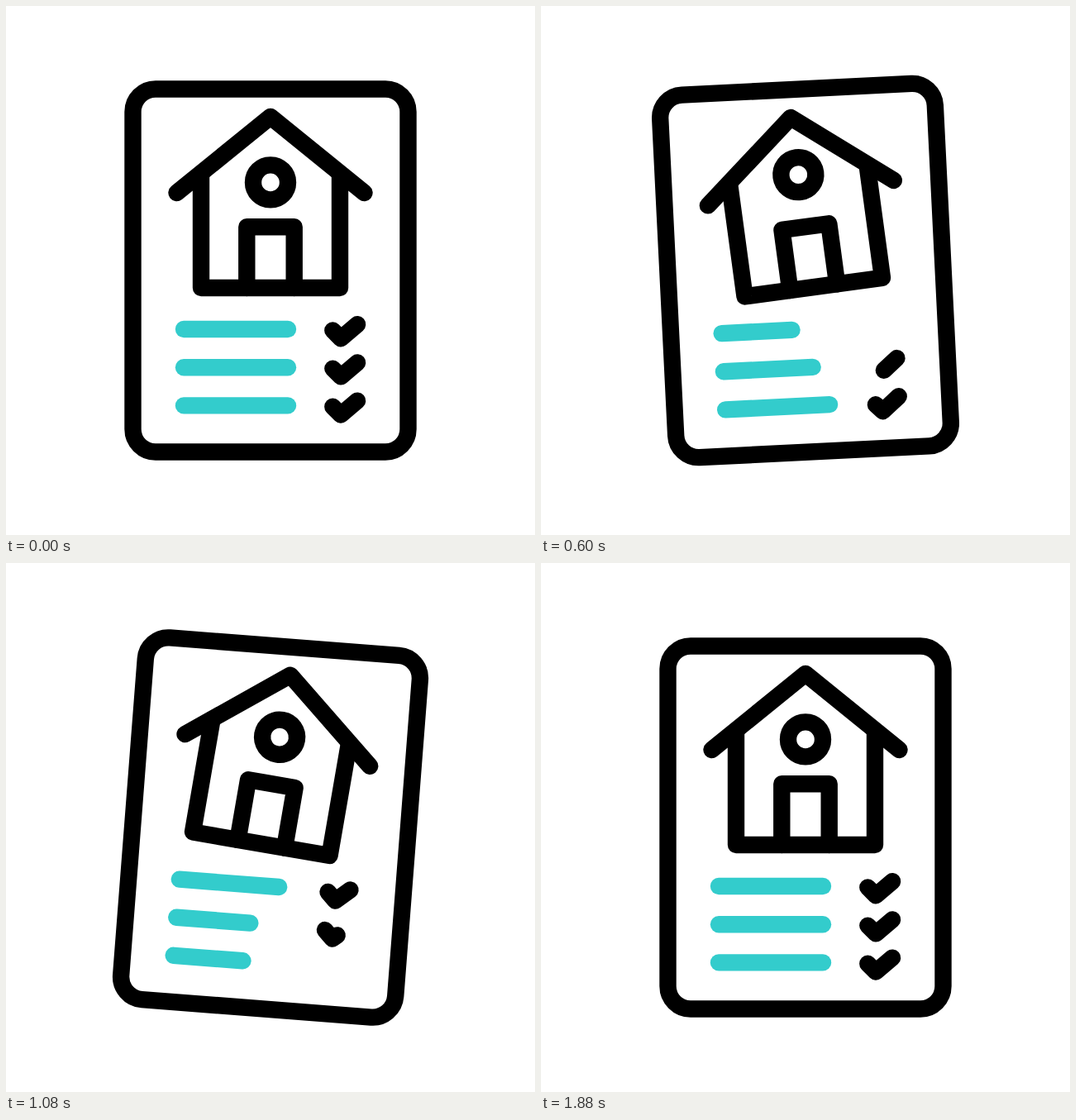
Recreate the animation shown at these times as an HTML page. Size 640 by 640 pixels, loop 1.96 s.

```html
<!DOCTYPE html>
<html lang="en">
<head>
<meta charset="utf-8">
<title>House checklist</title>
<style>
  html, body { margin: 0; width: 100%; height: 100%; overflow: hidden; background: #fff; }
  svg { display: block; width: 100%; height: 100%; }
  .ink { fill: none; stroke: #000; stroke-width: 20.4; stroke-linecap: round; stroke-linejoin: round; }
  .bar { stroke: #3cc; }
</style>
</head>
<body>
<svg viewBox="0 0 640 640">
  <g id="page" class="ink">
    <rect x="153.5" y="100.5" width="333" height="439" rx="27.5"/>
    <g id="house">
      <path d="M206.5 226 320 134 433.5 226"/>
      <path d="M236 206V341H404V206"/>
      <path d="M291.3 341V267.3H348.7V341"/>
      <circle id="window" cx="320" cy="213.4" r="21"/>
    </g>
    <g id="rows"></g>
  </g>
</svg>
<script>
const STEP = 40, LOOP = 1960, ROW_DELAY = 5;
const BAR = 126, BAR_CUT = 42;

// Keyframes: [step, value]
const pageTurn = [[1, 0], [10.7, -4], [13.3, -4], [22.5, 9], [23, 9], [33, -4], [44.8, 0]];
const houseTurn = [[1.5, 0], [14.2, -5.1], [24, 7.3], [36, -5], [45.5, 0]];
const windowLift = [[9, 0], [18.5, 14], [31, 0]];
const barCut = [[5, 0], [16, BAR_CUT], [20, BAR_CUT], [29, 0]];

const clamp = x => Math.min(1, Math.max(0, x));
const smooth = p => p * p * (3 - 2 * p);
const $ = id => document.getElementById(id);

function track(keys, t) {
  let value = keys[0][1];
  for (let i = 1; i < keys.length; i++) {
    const [t0, v0] = keys[i - 1], [t1, v1] = keys[i];
    if (t >= t0) value = v0 + (v1 - v0) * smooth(clamp((t - t0) / (t1 - t0)));
  }
  return value;
}

function addPath(className) {
  const path = document.createElementNS("http://www.w3.org/2000/svg", "path");
  path.setAttribute("class", className);
  $("rows").append(path);
  return path;
}

const rows = [0, 1, 2].map(i => {
  const y = 391 + i * 46.2;
  const bar = addPath("bar"), check = addPath("check");
  check.setAttribute("d", `M395.3 ${y + 1.4}l9.8 9.8 20-17`);
  return { y, bar, check, length: check.getTotalLength() };
});

// Tick wipes away from its start, then is drawn again.
function checkSpan(t) {
  const redraw = clamp((t - 17.85) / 13.4);
  if (redraw > 0) return [0, 1 - (1 - redraw) ** 2];
  return [clamp((t - 2.5) / 11) ** 2, 1];
}

function draw(t) {
  $("page").setAttribute("transform", `rotate(${track(pageTurn, t)} 320 320)`);
  $("house").setAttribute("transform", `rotate(${track(houseTurn, t)} 320 238)`);
  $("window").setAttribute("transform", `translate(0 ${-track(windowLift, t)})`);
  rows.forEach(({ y, bar, check, length }, i) => {
    const local = t - i * ROW_DELAY;
    bar.setAttribute("d", `M215 ${y}h${BAR - track(barCut, local)}`);
    const [from, to] = checkSpan(local);
    check.style.display = to - from < 0.005 ? "none" : "";
    check.style.strokeDasharray = `${(to - from) * length + (to === 1 ? 1 : 0)} 200`;
    check.style.strokeDashoffset = -from * length;
  });
}

const start = performance.now();
function tick() {
  const step = Math.floor(((performance.now() - start) % LOOP) / STEP);
  draw(Math.min(47, Math.max(1, step)));
  requestAnimationFrame(tick);
}
tick();
</script>
</body>
</html>
```
